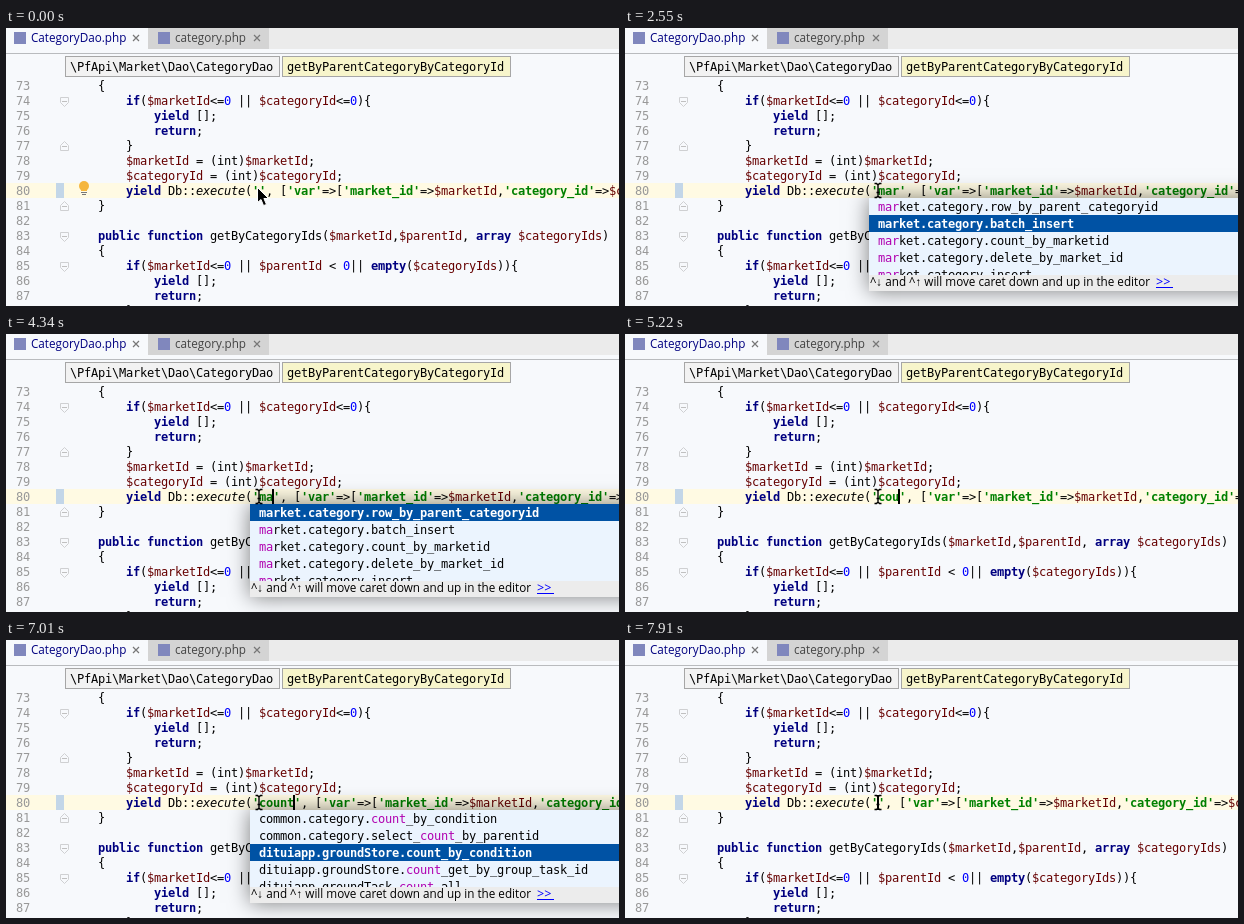
Recreate the animation shown at these times as an HTML page with a canvas. Size 613 by 278 pixels, loop 8000 ms.

```html
<!DOCTYPE html>
<html lang="en">
<head>
<meta charset="utf-8">
<title>Editor completion</title>
<style>
html, body { margin: 0; width: 613px; height: 278px; overflow: hidden; background: #f7f9fc; }
canvas { display: block; }
</style>
</head>
<body>
<canvas id="stage" width="613" height="278"></canvas>
<script>
const ctx = document.getElementById('stage').getContext('2d');
const W = 613, H = 278, LOOP = 8000;
const CELL = 7, LINE = 15, LEFT = 64, FIRST = 73, TOP = 50, CARET_LINE = 80;
const PAPER = '#f7f9fc';
const MONO = '12px "DejaVu Sans Mono", monospace';
const SANS = '"Open Sans", sans-serif';

const codeLines = typed => [
  '    {',
  '        if($marketId<=0 || $categoryId<=0){',
  '            yield [];',
  '            return;',
  '        }',
  '        $marketId = (int)$marketId;',
  '        $categoryId = (int)$categoryId;',
  `        yield Db::execute('${typed}', ['var'=>['market_id'=>$marketId,'category_id'=>$categoryId]]);`,
  '    }',
  '',
  '    public function getByCategoryIds($marketId,$parentId, array $categoryIds)',
  '    {',
  '        if($marketId<=0 || $parentId < 0|| empty($categoryIds)){',
  '            yield [];',
  '            return;',
  '        }'
];

const marketItems = [
  'market.category.row_by_parent_categoryid',
  'market.category.batch_insert',
  'market.category.count_by_marketid',
  'market.category.delete_by_market_id',
  'market.category.insert'
];
const countItems = [
  'common.category.count_by_condition',
  'common.category.select_count_by_parentid',
  'dituiapp.groundStore.count_by_condition',
  'dituiapp.groundStore.count_get_by_group_task_id',
  'dituiapp.groundTask.count_all'
];

// time, typed text, selected row (-1: list closed), caret visible
const steps = [
  [0, '', -1, 0], [450, '', -1, 1], [1500, 'm', -1, 1], [1800, 'ma', -1, 1],
  [2100, 'ma', 0, 1], [2550, 'mar', 1, 0], [2840, 'mar', 2, 1], [2990, 'mar', 1, 1],
  [3290, 'mar', 0, 0], [3440, 'mar', 0, 1], [4040, 'mar', 0, 0], [4340, 'ma', 0, 1],
  [4480, 'm', -1, 1], [4630, '', -1, 1], [4930, 'c', -1, 1], [5080, 'co', -1, 1],
  [5220, 'cou', -1, 1], [5370, 'cou', 0, 1], [5670, 'coun', 0, 1], [5820, 'count', 0, 1],
  [6410, 'count', 1, 0], [6710, 'count', 2, 0], [7010, 'count', 2, 1], [7160, 'count', 3, 1],
  [7310, 'count', 4, 1], [7610, 'coun', -1, 1], [7760, 'c', -1, 1], [7910, '', -1, 1]
];

const tokenStyles = [
  [/^'/, '#008000', 'bold '],
  [/^\$/, '#660000', ''],
  [/^(if|yield|return|public|function|array|empty)$/, '#000080', 'bold '],
  [/^\d/, '#0000ff', ''],
  [/^execute$/, '#000', 'italic ']
];

function rect(x, y, w, h, color) {
  ctx.fillStyle = color;
  ctx.fillRect(x, y, w, h);
}

function path(points, fill, stroke) {
  ctx.beginPath();
  points.forEach(([x, y]) => ctx.lineTo(x, y));
  ctx.closePath();
  ctx.fillStyle = fill;
  ctx.fill();
  ctx.strokeStyle = stroke;
  ctx.lineWidth = 1;
  ctx.stroke();
}

function label(text, x, y, size, color = '#000') {
  ctx.font = `${size}px ${SANS}`;
  ctx.fillStyle = color;
  ctx.fillText(text, x, y);
}

function mono(text, x, y, color, style = '') {
  ctx.font = style + MONO;
  ctx.fillStyle = color;
  [...text].forEach((ch, i) => ctx.fillText(ch, x + i * CELL, y));
}

function codeLine(text, y) {
  for (const match of text.matchAll(/'[^']*'|\$?\w+|[^\s\w$']+/g)) {
    const [, color, style] = tokenStyles.find(([re]) => re.test(match[0])) || [0, '#000', ''];
    mono(match[0], LEFT + match.index * CELL, y, color, style);
  }
}

function tab(x, name, color, closeX) {
  rect(x, 4, 12, 12, '#8087bd');
  label(name, x + 17, 14, 11.7, color);
  ctx.strokeStyle = '#777';
  ctx.lineWidth = 1.2;
  ctx.beginPath();
  ctx.moveTo(closeX, 7); ctx.lineTo(closeX + 6, 13);
  ctx.moveTo(closeX + 6, 7); ctx.lineTo(closeX, 13);
  ctx.stroke();
}

function crumb(x, width, text, fill) {
  rect(x, 28, width, 21, '#a6a6a6');
  rect(x + 1, 29, width - 2, 19, fill);
  mono(text, x + 5, 43, '#000');
}

function header() {
  rect(0, 0, W, TOP, PAPER);
  rect(142, 0, W, 21, '#ebebeb');
  rect(142, 0, 121, 21, '#d4d4d4');
  rect(0, 25, W, 1, '#b9bbbe');
  tab(8, 'CategoryDao.php', '#000080', 127);
  tab(152, 'category.php', '#444', 248);
  crumb(59, 215, '\\PfApi\\Market\\Dao\\CategoryDao', '#f2f2f2');
  crumb(276, 229, 'getByParentCategoryByCategoryId', '#f7f5cb');
}

function foldMark(line, dir) {
  const y = TOP + (line - FIRST) * LINE + 8;
  const shape = [[-4, -4], [4, -4], [4, 1], [0, 5], [-4, 1]];
  path(shape.map(([dx, dy]) => [58.5 + dx, y + .5 + dy * dir]), PAPER, '#cfd0d2');
  rect(56, y, 5, 1, '#c0c0c0');
}

function editor(typed) {
  rect(0, TOP, W, H - TOP, PAPER);
  const caretTop = TOP + (CARET_LINE - FIRST) * LINE;
  rect(0, caretTop, W, LINE, '#fffae3');
  rect(50, caretTop, 8, LINE, '#c3d6e8');
  codeLines(typed).forEach((text, i) => {
    const y = TOP + i * LINE + 12;
    mono(String(FIRST + i), 10, y, '#999');
    codeLine(text, y);
  });
  [74, 83, 85].forEach(n => foldMark(n, 1));
  [77, 81, 88].forEach(n => foldMark(n, -1));
}

function bulb() {
  ctx.beginPath();
  ctx.arc(78, 158, 5, 0, 7);
  ctx.fillStyle = '#f5b63f';
  ctx.fill();
  rect(75, 161, 6, 2, '#f5b63f');
  rect(75, 164, 6, 1, '#777');
  rect(76, 166, 4, 1, '#777');
}

function popup(items, prefix, selected) {
  const x = 244, y = 170, row = 17, listHeight = 77, footer = 16;
  ctx.save();
  ctx.shadowColor = 'rgba(0,0,0,.5)';
  ctx.shadowBlur = 20;
  rect(x, y, W, listHeight + footer, '#ebf4fe');
  ctx.restore();
  ctx.save();
  ctx.beginPath();
  ctx.rect(x, y, W, listHeight);
  ctx.clip();
  items.forEach((text, i) => {
    const top = y + i * row, base = top + 13, on = i === selected;
    if (on) {
      rect(x, top, W, row, '#0052a4');
      mono(text, 253, base, '#fff', 'bold ');
      return;
    }
    const at = text.indexOf(prefix);
    [...text].forEach((ch, k) => {
      const hit = k >= at && k < at + prefix.length;
      mono(ch, 253 + k * CELL, base, hit ? '#b000b0' : '#000');
    });
  });
  ctx.restore();
  rect(x, y + listHeight, W, footer, '#ececec');
  label('^↓ and ^↑ will move caret down and up in the editor', 245, 258, 11.7);
  label('>>', 531, 258, 12.5, '#0000ff');
  rect(531, 259, 17, 1, '#0000ff');
}

function arrow() {
  const shape = [[0, 0], [0, 15], [3.5, 12], [6, 18], [9, 17], [6.4, 11], [11, 11]];
  path(shape.map(([dx, dy]) => [251.5 + dx, 159.5 + dy]), '#000', '#fff');
}

function iBeam() {
  ctx.strokeStyle = '#000';
  ctx.lineWidth = 1.4;
  ctx.beginPath();
  for (const dir of [-1, 1]) {
    const end = 162.5 + dir * 7;
    ctx.moveTo(249.5, end);
    ctx.lineTo(251.5, end);
    ctx.lineTo(253, end - dir * 1.5);
    ctx.lineTo(254.5, end);
    ctx.lineTo(256.5, end);
  }
  ctx.moveTo(253, 157);
  ctx.lineTo(253, 168);
  ctx.moveTo(251.5, 164.5);
  ctx.lineTo(254.5, 164.5);
  ctx.stroke();
}

function draw(now) {
  const t = now % LOOP;
  const [, typed, selected, caret] = steps.findLast(step => step[0] <= t);
  editor(typed);
  header();
  if (t < 450 || (t >= 1350 && t < 1500)) bulb();
  if (caret) rect(252 + typed.length * CELL, 155, 2, LINE, '#000');
  if (selected >= 0) popup(typed[0] === 'm' ? marketItems : countItems, typed, selected);
  if (t < 450) arrow(); else iBeam();
}

const start = performance.now();
function frame() {
  draw(performance.now() - start);
  requestAnimationFrame(frame);
}
frame();
</script>
</body>
</html>
```
